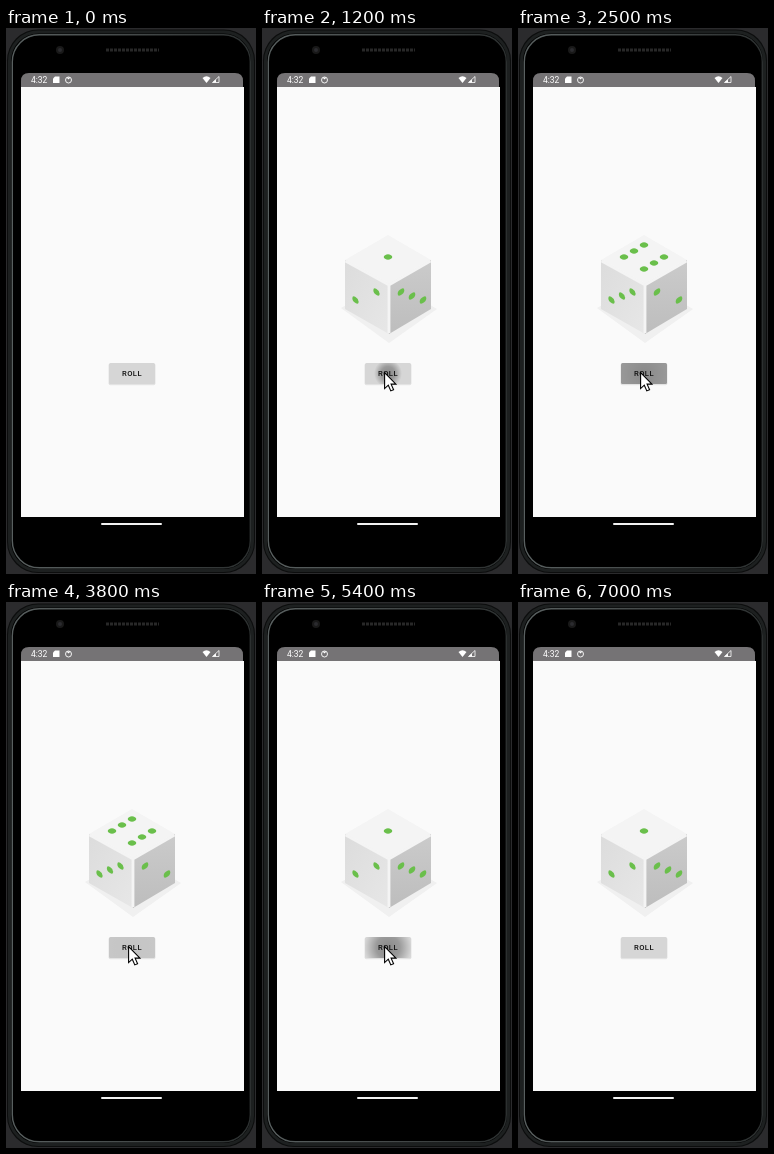
Write an HTML page that moves like this. It is 250 by 546 pixels and loops after 7.2 s.

```html
<!DOCTYPE html>
<html lang="en">
<head>
<meta charset="utf-8">
<title>Dice roller</title>
<style>
html, body { margin: 0; width: 100%; height: 100%; overflow: hidden; background: #2b2b2d; }
svg { display: block; width: 250px; height: 546px; }
text { font-family: Roboto, sans-serif; }
</style>
</head>
<body>
<svg viewBox="0 0 250 546">
  <defs>
    <linearGradient id="rim" x2="1" y2="0">
      <stop stop-color="#596060"/><stop offset=".5" stop-color="#454a4a"/><stop offset="1" stop-color="#2c3030"/>
    </linearGradient>
    <linearGradient id="left" x2="1" y2="1">
      <stop stop-color="#dcdcdc"/><stop offset="1" stop-color="#e7e7e7"/>
    </linearGradient>
    <linearGradient id="right" x2="0" y2="1">
      <stop stop-color="#cbcbcb"/><stop offset="1" stop-color="#bdbdbd"/>
    </linearGradient>
    <radialGradient id="ink">
      <stop stop-color="#000" stop-opacity=".36"/><stop offset=".5" stop-color="#000" stop-opacity=".28"/>
      <stop offset="1" stop-color="#000" stop-opacity="0"/>
    </radialGradient>
    <clipPath id="key"><rect x="103" y="335" width="46" height="21" rx="1.5"/></clipPath>
  </defs>

  <!-- phone -->
  <rect x="1" y="1.5" width="248" height="543.5" rx="31" fill="#0c0d0d"/>
  <rect x="3.5" y="4" width="243" height="538.5" rx="29" fill="#000" stroke="#1d2020" stroke-width="3"/>
  <rect x="6.3" y="6.8" width="238" height="533" rx="27" fill="#000" stroke="url(#rim)" stroke-width="1.4"/>
  <circle cx="54" cy="22" r="4" fill="#191919"/>
  <circle cx="54" cy="22" r="2" fill="#2b2b2f"/>
  <path d="M100 22H153" stroke="#282828" stroke-width="3" stroke-dasharray="3 1"/>
  <path d="M15 59H238V489H15Z" fill="#fafafa"/>
  <path d="M15 59V53Q15 45 23 45H229Q237 45 237 53V59Z" fill="#757375"/>
  <rect x="95" y="495" width="61" height="2" rx="1" fill="#f2f2f2"/>

  <!-- status bar -->
  <g fill="#fff">
    <text x="25" y="54.7" font-size="8.5">4:32</text>
    <path d="M49 48.5H53.5V55H47V50.5Z"/>
    <circle cx="62.5" cy="52" r="3" fill="none" stroke="#fff" stroke-width=".9"/>
    <path d="M60.5 49.5L62.5 51.5L64.5 49.5Z"/>
    <path d="M196.5 50Q200.5 46.5 204.5 50L200.5 55Z"/>
    <path d="M213 48.5V54.5H206.5Z" fill="none" stroke="#fff" stroke-width=".8"/>
    <path d="M210 51.5V54.5H206.5Z"/>
  </g>

  <!-- die -->
  <g id="die">
    <path d="M79 280L126 252L175 281L127 315Z" fill="#f0f0f0"/>
    <path d="M126 207L169 232L127 256L83 232Z" fill="#f4f4f4"/>
    <path d="M83 232L127 256V306L83 281Z" fill="url(#left)"/>
    <path d="M169 232L127 256V306L169 281Z" fill="url(#right)"/>
    <path d="M83.5 233L127 257L168.5 233M127 256V305" fill="none" stroke="#f4f4f4" stroke-width="2.8"/>
    <g id="pips" fill="#6abf4b"></g>
  </g>

  <!-- button -->
  <rect x="102.5" y="335.5" width="47" height="21.8" rx="2" fill="#e3e3e3"/>
  <rect x="103" y="335" width="46" height="21" rx="1.5" fill="#d6d6d6"/>
  <g clip-path="url(#key)"><circle id="ripple" cx="126" cy="345.5" fill="url(#ink)"/></g>
  <text x="126" y="348.2" font-size="7.6" font-weight="500" text-anchor="middle" letter-spacing=".45" fill="#111">ROLL</text>

  <path id="cursor" d="M0 0V16L3.7 12.6L6.2 18.3L9 17.1L6.5 11.5H11.3Z" fill="#fff" stroke="#000" stroke-width="1.1"/>
</svg>
<script>
const LOOP = 7200, STEP = 100, ENTER = 1000, LEAVE = 6400, EXIT = 600;
const $ = id => document.getElementById(id);
const clamp = x => Math.max(0, Math.min(1, x));

// each visible side as an SVG matrix: two axes and the centre
const sides = ["10 6 -10 6 126 229", "10.5 6 0 -10 104 268", "11 -6 0 10 150 268"];

// tap time and the values on top, left and right
const taps = [[1200, "123"], [2300, "632"], [2800, "421"], [3400, "632"],
  [4000, "421"], [4600, "632"], [5300, "123"]];

function spots(n) {
  const list = n % 2 ? [[0, 0]] : [];
  if (n > 1) list.push([-1, -1], [1, 1]);
  if (n > 3) list.push([-1, 1], [1, -1]);
  if (n > 5) list.push([-1, 0], [1, 0]);
  return list;
}

function pips(values) {
  return sides.map((m, i) => `<g transform="matrix(${m})">` +
    spots(+values[i]).map(([x, y]) => `<circle cx="${x}" cy="${y}" r=".3"/>`).join("") + "</g>").join("");
}

function pointer(t) {
  const away = (1 - clamp(t / ENTER)) ** 3;
  const drop = clamp((t - LEAVE) / EXIT) ** 3;
  return [122.6 + 165 * away - 5 * drop, 344.6 + 215 * away + 207 * drop];
}

let shown;
function draw(now) {
  const t = Math.floor(now % LOOP / STEP) * STEP;
  const [time, values] = taps.filter(tap => tap[0] <= t).pop() || [-LOOP, ""];
  if (values !== shown) {
    shown = values;
    $("die").setAttribute("visibility", values ? "visible" : "hidden");
    $("pips").innerHTML = values && pips(values);
  }
  const age = t - time;
  $("ripple").setAttribute("r", 14 + 38 * (Math.min(age, 260) / 200) ** 2);
  $("ripple").setAttribute("opacity", clamp((450 - age) / 220));
  $("cursor").setAttribute("transform", `translate(${pointer(t)})`);
}

const start = performance.now();
function tick() {
  draw(performance.now() - start);
  requestAnimationFrame(tick);
}
tick();
</script>
</body>
</html>
```
